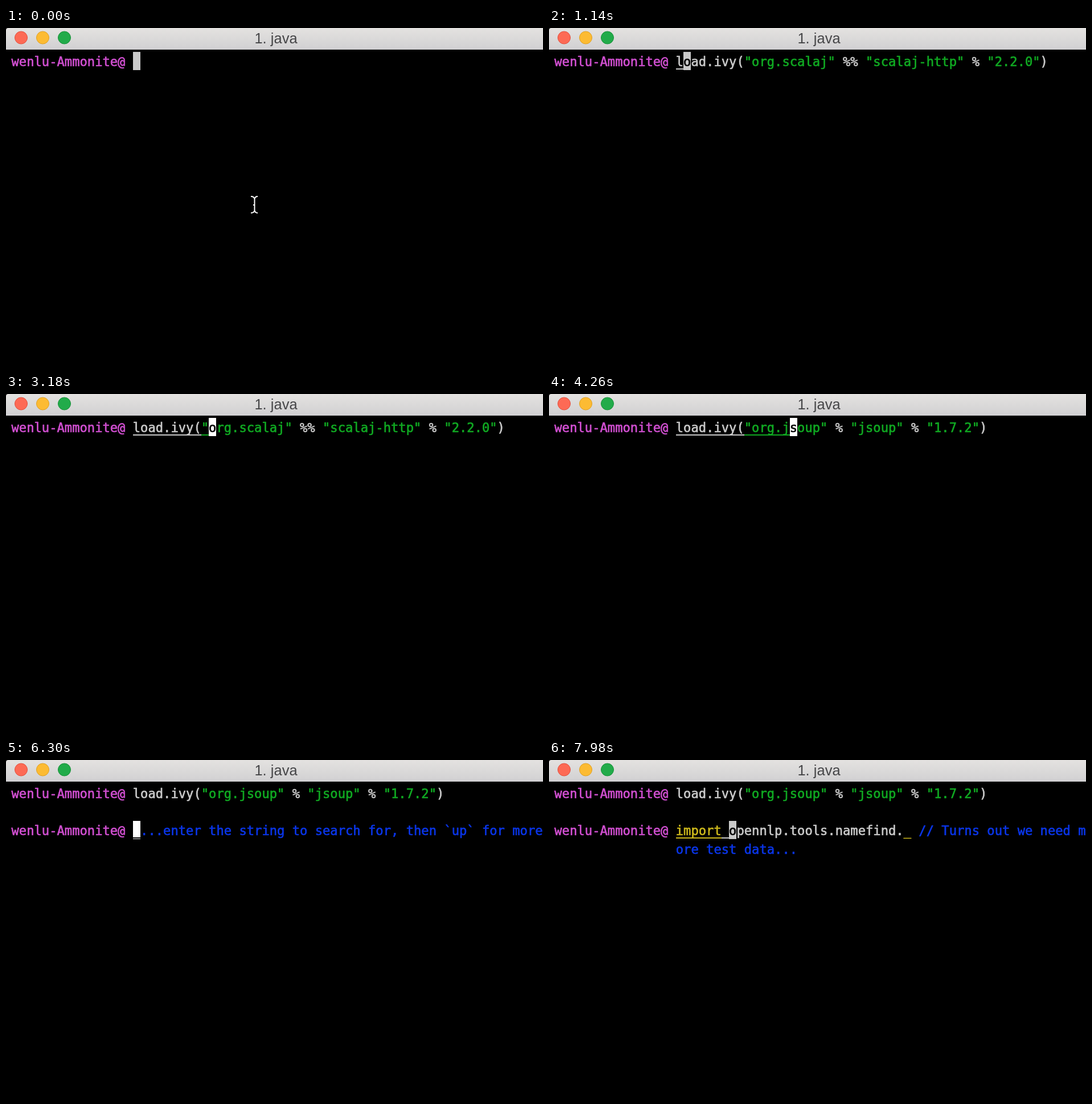
Write an HTML page with a canvas that moves like this. It is 943 px wide and 594 px high and loops after 8000 ms.

```html
<!DOCTYPE html>
<html lang="en">
<head>
<meta charset="utf-8">
<title>Terminal history search</title>
<style>
  html, body { margin: 0; width: 100%; height: 100%; overflow: hidden; background: #000; }
  canvas { display: block; }
</style>
</head>
<body>
<canvas id="stage" width="943" height="594"></canvas>
<script>
const ctx = document.getElementById("stage").getContext("2d");
const LOOP = 8000;
const COL_W = 13.33, ROW_H = 32.5, LEFT = 9.5, TOP = 42;
const COLS = 70, INDENT = 16;
const MONO = '22.15px "DejaVu Sans Mono", monospace';

const GRAY = "#c9c9c9", GREEN = "#10a822", BLUE = "#0a35e6";
const YELLOW = "#ccb81c", MAGENTA = "#d04fd0", WHITE = "#ffffff";

const PROMPT = "wenlu-Ammonite@";
const HINT = [[" ", GRAY], ["...enter the string to search for, then `up` for more", BLUE]];
const HTTP = [
  ["load.ivy(", GRAY], ['"org.scalaj"', GREEN], [" %% ", GRAY],
  ['"scalaj-http"', GREEN], [" % ", GRAY], ['"2.2.0"', GREEN], [")", GRAY]
];
const SOUP = [
  ["load.ivy(", GRAY], ['"org.jsoup"', GREEN], [" % ", GRAY],
  ['"jsoup"', GREEN], [" % ", GRAY], ['"1.7.2"', GREEN], [")", GRAY]
];
const IMPORT = [
  ["import", YELLOW], [" opennlp.tools.namefind.", GRAY], ["_", YELLOW], [" ", GRAY],
  ["// Turns out we need more test data...", BLUE]
];

// Times of the main steps and of each key of the two queries.
const SEARCH_1 = 700, ENTER = 5160, PROMPT_2 = 5520, SEARCH_2 = 6000;
const KEYS_1 = [1080, 1260, 1380, 1500, 2580, 2680, 2780, 2880, 2980, 3120,
                3360, 3480, 3600, 3720, 3900];
const KEYS_2 = [6480, 6600, 6720, 6900, 7020, 7140, 7260];

const typed = (keys, t) => keys.filter(k => k <= t).length;
const mod = (a, n) => ((a % n) + n) % n;
const blinkOn = t => mod(t - 2840, 1400) < 690;

// A thin outline gives the heavier strokes of terminal font smoothing.
function drawChar(ch, col, row, color) {
  const x = LEFT + col * COL_W, y = TOP + row * ROW_H + 25;
  ctx.fillStyle = ctx.strokeStyle = color;
  ctx.lineWidth = 0.7;
  ctx.fillText(ch, x, y);
  ctx.strokeText(ch, x, y);
}

function drawPrompt(row) {
  [...PROMPT].forEach((ch, i) => drawChar(ch, i, row, MAGENTA));
}

function underline(col, row, color) {
  const x = Math.round(LEFT + col * COL_W), end = Math.round(LEFT + (col + 1) * COL_W);
  ctx.fillStyle = color;
  ctx.fillRect(x, Math.round(TOP + row * ROW_H + 28.5), end - x, 2);
}

function drawCursor(col, row, color) {
  const x = Math.round(LEFT + col * COL_W);
  ctx.fillStyle = color;
  ctx.fillRect(x, Math.round(TOP + row * ROW_H), 13, 32);
}

// Draws coloured runs after the prompt, wrapping at the last column.
function drawInput(runs, row, marked, cursorColor) {
  const cells = runs.flatMap(([text, color]) => [...text].map(ch => [ch, color]));
  const width = COLS - INDENT;
  cells.forEach(([ch, color], i) => {
    const col = INDENT + i % width, r = row + Math.floor(i / width);
    if (i === marked) {
      drawCursor(col, r, cursorColor || color);
      drawChar(ch, col, r, "#000");
    } else {
      if (i < marked) underline(col, r, color);
      drawChar(ch, col, r, color);
    }
  });
}

function drawTitleBar() {
  const fill = ctx.createLinearGradient(0, 0, 0, 38);
  fill.addColorStop(0, "#e4e2e0");
  fill.addColorStop(1, "#d1d0d2");
  ctx.fillStyle = fill;
  ctx.beginPath();
  ctx.roundRect(0, 0, 943, 38, [4, 0, 0, 0]);
  ctx.fill();

  const lights = [["#fd6a55", "#e2503f"], ["#fcbb33", "#dfa023"], ["#22ab4a", "#179038"]];
  lights.forEach(([color, edge], i) => {
    ctx.beginPath();
    ctx.arc(26.5 + 38 * i, 17, 11, 0, Math.PI * 2);
    ctx.fillStyle = color;
    ctx.fill();
    ctx.strokeStyle = edge;
    ctx.lineWidth = 1;
    ctx.stroke();
  });

  ctx.fillStyle = "#464648";
  ctx.font = '25.5px "Liberation Sans", Arial, sans-serif';
  ctx.textAlign = "center";
  ctx.fillText("1. java", 474, 26.5);
  ctx.textAlign = "left";
}

function drawPointer() {
  ctx.strokeStyle = WHITE;
  ctx.lineWidth = 2;
  ctx.beginPath();
  for (const [tip, bend] of [[296, 301], [325, 320]]) {
    ctx.moveTo(430, tip);
    ctx.quadraticCurveTo(436, tip, 436.5, bend);
    ctx.quadraticCurveTo(437, tip, 442, tip);
  }
  ctx.moveTo(436.5, 301);
  ctx.lineTo(436.5, 320);
  ctx.moveTo(434, 311);
  ctx.lineTo(437, 311);
  ctx.stroke();
}

function drawSearch(row, count, found, color) {
  if (count) {
    drawInput(found, row, count, color);
  } else {
    drawInput(HINT, row, 0, color);
    underline(INDENT, row, "#000");
  }
}

function draw(t) {
  ctx.fillStyle = "#000";
  ctx.fillRect(0, 0, 943, 594);
  drawTitleBar();

  ctx.font = MONO;
  ctx.lineJoin = "round";
  const blink = blinkOn(t) ? WHITE : null;
  drawPrompt(0);
  if (t < SEARCH_1) {
    drawCursor(INDENT, 0, blink || GRAY);
    drawPointer();
  } else if (t < ENTER) {
    const n = typed(KEYS_1, t);
    drawSearch(0, n, n < KEYS_1.length ? HTTP : SOUP, blink);
  } else {
    drawInput(SOUP, 0, -1);
  }

  if (t < PROMPT_2) return;
  drawPrompt(2);
  if (t < SEARCH_2) drawCursor(INDENT, 2, blink || GRAY);
  else drawSearch(2, typed(KEYS_2, t), IMPORT, blink);
}

const start = performance.now();
function tick() {
  draw((performance.now() - start) % LOOP);
  requestAnimationFrame(tick);
}
tick();
</script>
</body>
</html>
```
